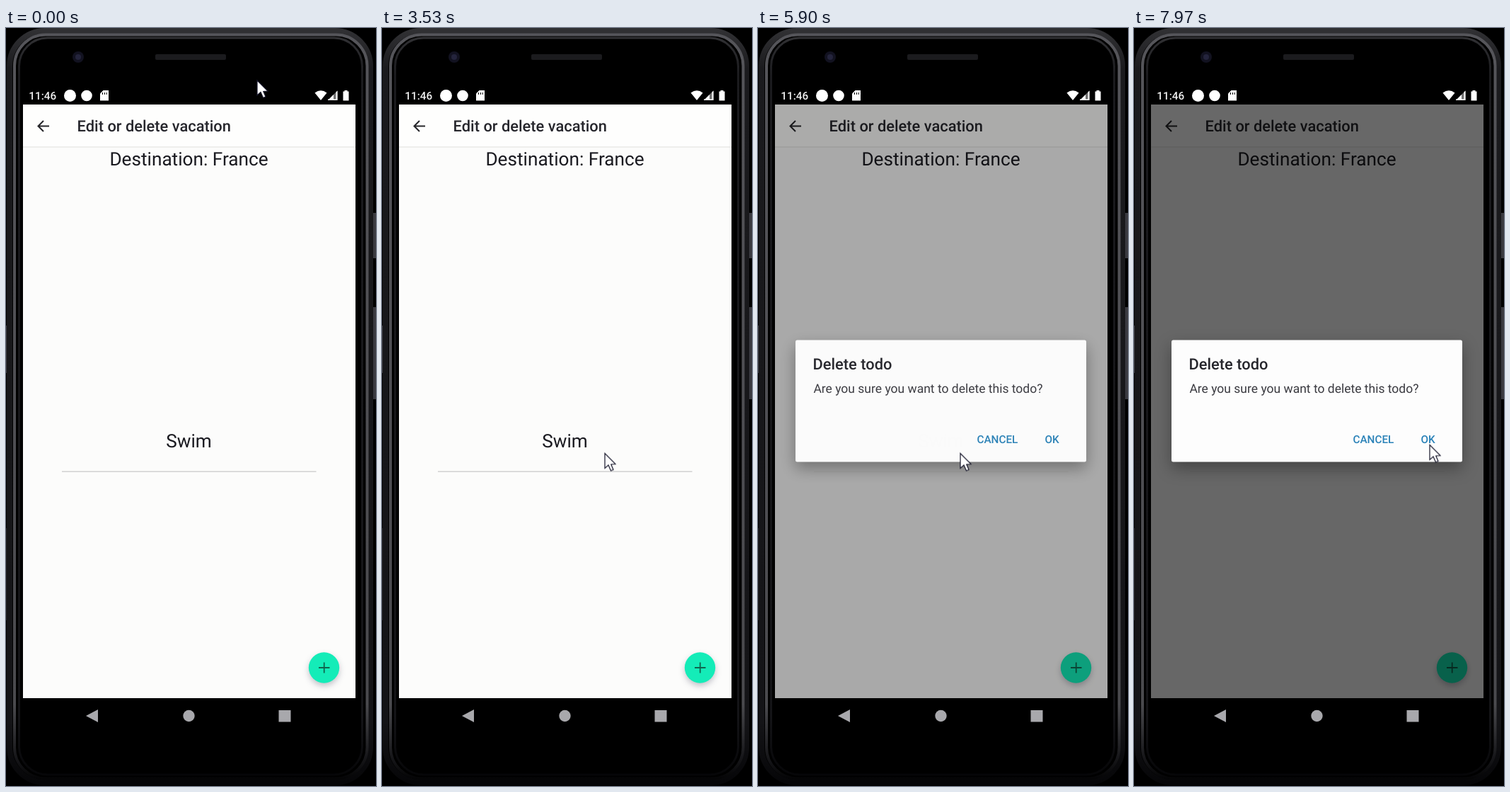
Write an HTML page that moves like this. It is 523x1070 px and loops after 8000 ms.

```html
<!DOCTYPE html>
<html lang="en">
<head>
<meta charset="utf-8">
<title>Delete a todo</title>
<style>
  html, body { margin: 0; width: 100%; height: 100%; overflow: hidden; background: #000; }
  svg { display: block; width: 523px; height: 1070px; }
  text { font-family: Roboto, Arial, sans-serif; fill: #1a1a20; text-rendering: geometricPrecision; }
  .medium { font-weight: 500; }
  .large { font-size: 26.2px; text-anchor: middle; }
  .title { font-size: 21.85px; fill: #26262c; }
  .body { font-size: 17.5px; fill: #3a3a40; }
  .small { font-size: 15.3px; }
  .clock { fill: #f0f0f0; }
  .action { fill: #2a82b8; }

  .rim { filter: blur(.7px); }
  .fab { filter: drop-shadow(0 4px 4px rgba(20, 20, 50, .25)); }
  .card { filter: drop-shadow(0 9px 11px rgba(0, 0, 0, .34)); }

  .item, .dim, .dialog, .cursor { animation: 8s linear infinite; }
  .item { animation-name: press; animation-timing-function: step-end; }
  .dim { animation-name: dim; }
  .dialog { animation-name: dialog; }
  .panel { animation: grow 8s linear infinite; transform-origin: 258.5px 526.5px; }
  .cursor { animation-name: move; animation-timing-function: ease-in-out; }

  @keyframes press {
    0% { opacity: 1; }
    64.25%, 100% { opacity: .2; }
  }
  @keyframes dim {
    0%, 72.25% { opacity: 0; }
    74.95%, 100% { opacity: .59; }
  }
  @keyframes dialog {
    0%, 72.25% { opacity: 0; }
    73.8%, 100% { opacity: 1; }
  }
  @keyframes grow {
    0% { transform: scale(.9); }
    72.25% { transform: scale(.9); animation-timing-function: cubic-bezier(.1, .8, .2, 1); }
    73.8%, 100% { transform: none; }
  }
  @keyframes move {
    0% { transform: translate(355px, 74px); }
    22.125% { transform: translate(231px, 381.5px); }
    44.125% { transform: translate(315px, 600.5px); }
    51.625% { transform: translate(307px, 600.5px); }
    54.625%, 58% { transform: translate(282px, 599px); }
    58.75%, 75.6% { transform: translate(286px, 600.5px); }
    86.75% { transform: translate(478px, 586.5px); }
    90.5% { transform: translate(484px, 586.5px); }
    99.6%, 100% { transform: translate(418px, 588.5px); }
  }
</style>
</head>
<body>
<svg viewBox="0 0 523 1070">
  <defs>
    <linearGradient id="shine" x1="0" y1="0" x2="0" y2="1">
      <stop offset="0" stop-color="#55555a"/>
      <stop offset=".9" stop-color="#4a4a4e"/>
      <stop offset=".97" stop-color="#18181b"/>
      <stop offset="1" stop-color="#050506"/>
    </linearGradient>
    <linearGradient id="edge" x1="0" y1="0" x2="0" y2="1">
      <stop offset="0" stop-color="#303033"/>
      <stop offset=".05" stop-color="#1b1b1e"/>
      <stop offset=".92" stop-color="#141417"/>
      <stop offset="1" stop-color="#060608"/>
    </linearGradient>
  </defs>

  <rect width="523" height="1070"/>

  <!-- Phone body -->
  <g fill="#3a3a40">
    <rect x="519" y="261" width="4" height="64"/>
    <rect x="519" y="394" width="4" height="130"/>
    <rect y="420" width="1.5" height="67"/>
    <rect y="706" width="1.5" height="130" opacity=".5"/>
  </g>
  <g class="rim" fill="none">
    <rect x="5" y="4" width="510" height="1061" rx="50" stroke="url(#edge)" stroke-width="8"/>
    <rect x="12" y="9.5" width="498.500" height="1050" rx="44" stroke="url(#shine)" stroke-width="4"/>
    <rect x="18.500" y="14" width="485" height="1040" rx="40" stroke="url(#edge)" stroke-width="3"/>
  </g>
  <rect x="211" y="37" width="100" height="8" rx="2" fill="#1b1b1e"/>
  <circle cx="102" cy="41" r="8" fill="#121220"/>
  <circle cx="102" cy="41" r="4" fill="#24243c"/>

  <!-- Status bar -->
  <text class="small medium clock" x="32.300" y="101">11:46</text>
  <g fill="#fff">
    <circle cx="90.500" cy="95.500" r="8.500"/>
    <circle cx="114" cy="95.500" r="7.800"/>
    <path d="M137.500 88H145V102.500H133V92.500Z"/>
    <path d="M436.500 91.500Q445 85 453.500 91.500L445 102Z"/>
    <path d="M455 102L468.500 88.500V102Z" opacity=".45"/>
    <path d="M455 102L463 94V102ZM466.500 90.500L468.500 88.500V102H455V100.500H466.500Z"/>
    <path d="M478.500 88H482.500V89.500H484.500V102.500H476.500V89.500H478.500Z"/>
  </g>
  <path d="M136.500 91V94M139.500 91V94M142.300 91V94" stroke="#000"/>

  <!-- App screen -->
  <rect x="24" y="108" width="470" height="838" fill="#fcfcfb"/>
  <rect x="24" y="108" width="470" height="59" fill="#fefefd"/>
  <rect x="24" y="167" width="470" height="2" fill="#eeeeec"/>
  <path d="M61 138.500H46M53 131L45.500 138.500L53 146" fill="none" stroke="#26262a" stroke-width="2"/>
  <text class="title medium" x="100.600" y="146">Edit or delete vacation</text>
  <text class="large" x="258.500" y="194">Destination: France</text>
  <g class="item">
    <text class="large" x="258.500" y="592">Swim</text>
    <rect x="79" y="625.600" width="359.500" height="1" fill="#bcbcbc"/>
  </g>
  <circle class="fab" cx="449.500" cy="903" r="21.700" fill="#14ecb8"/>
  <path d="M442 903H457.500M449.700 895.500V910.500" stroke="#10664f" stroke-width="1.800"/>
  <rect class="dim" x="24" y="108" width="470" height="838"/>

  <!-- Dialog -->
  <g class="dialog">
    <g class="panel">
      <rect class="card" x="53" y="440.500" width="411" height="172" rx="2.500" fill="#fdfdfd"/>
      <text class="title medium" x="77.500" y="482.300">Delete todo</text>
      <text class="body" x="78.400" y="514.500">Are you sure you want to delete this todo?</text>
      <text class="small medium action" x="309.400" y="586">CANCEL</text>
      <text class="small medium action" x="405.400" y="586">OK</text>
    </g>
  </g>

  <!-- Navigation bar -->
  <g fill="#a8a8ac">
    <path d="M113 971L130 962V980Z"/>
    <circle cx="258.500" cy="971" r="8.200"/>
    <rect x="385.500" y="963" width="17" height="16.500"/>
  </g>

  <path class="cursor" d="M0 0V21L5 16.500L8.500 24.500L12 23L8.800 15.500L15 15Z"
        fill="#fff" stroke="#16162a" stroke-width="1.200"/>
</svg>
</body>
</html>
```
